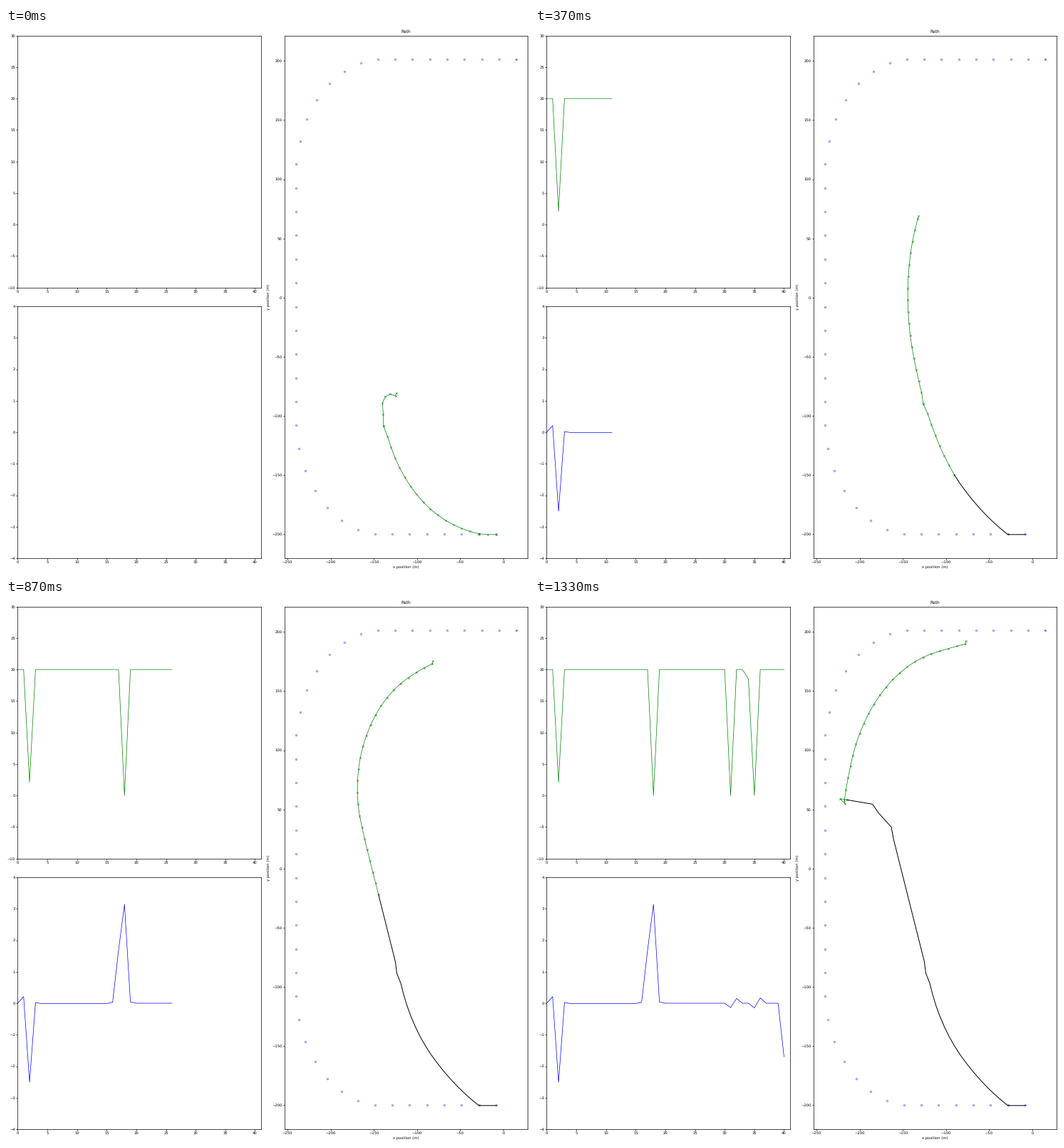
A matplotlib script that plays this animation: 734 px wide and 763 px high, repeating every 1.36 s.

```python
import numpy as np
import matplotlib.pyplot as plt
from matplotlib.animation import FuncAnimation

W, H, DPI = 734, 763, 36
TICKS, TICK_MS = 136, 10
STEPS, HORIZON = 41, 25
CRUISE, DT = 20.0, 0.5

plt.rcParams.update({
    "font.family": "DejaVu Sans", "font.size": 10.4, "text.hinting": "none",
    "axes.linewidth": 1.4, "xtick.major.width": 1.4, "ytick.major.width": 1.4,
    "axes.titlepad": 7.2, "lines.linewidth": 1.4, "lines.markersize": 6,
})


def stadium():
    """Waypoints 20.1 m apart along straights joined by two quarter circles."""
    ds, radius = 0.1, 100
    s = ds * np.arange(8041)
    turned = sum(np.clip((s - bend) / radius, 0, np.pi / 2) for bend in (155.7, 514.8))
    z = 15.4 + 201.5j + ds * np.cumsum(np.exp(1j * (np.pi + turned)))
    return z[::201]


def speeds(step):
    """Speeds as planned at a step; some changes are not foreseen."""
    v = np.full(STEPS + HORIZON, CRUISE)
    for at, value, known in ((2, 2.1, 0), (18, 0, 0), (31, 0, 31), (34, 18.5, 34),
                             (35, 0, 35), (41, -19, 40), (42, 8, 40)):
        if step >= known:
            v[at] = value
    return v


def move(start, v, degrees):
    """Positions reached from start with a speed and heading per step."""
    hops = DT * v * np.exp(1j * np.radians(degrees))
    return start + np.concatenate(([0], np.cumsum(hops)))


# Headings in degrees: the driven course, and the planned ones further ahead
course = np.interp(np.arange(STEPS),
                   [1, 3, 9, 16, 20, 30, 32, 33, 34, 36, 37],
                   [180, 149, 135, 109, 109, 109, 104, 141, 141, 133, 173])
swerve = np.zeros(STEPS + HORIZON)
swerve[[17, 19]] = 9, -9
KEY_STEPS = [0, 7, 11, 17, 26, 34, 40]
AHEAD = {
    3: [169, 134, 119, 107, 109, 140, 78],
    6: [158, 128, 113, 102, 106, 85, 73],
    12: [131, 116, 104, 87, 72, 50, 48],
    20: [96, 100, 81, 56, 29, 12, 13],
    24: [-52, 92, 67, 42, 17, 8, 10],
}

track = stadium()
speed = speeds(STEPS)[:STEPS]
past = move(-7.8 - 200.7j, speed[:-1], (course + swerve[:STEPS])[:-1])

steer = np.zeros(STEPS)
steer[4:16] = -0.01
steer[[1, 2, 3, 16, 17, 18, 19]] = 0.21, -2.51, 0.02, 0.03, 1.68, 3.14, 0.04
steer[[31, 32, 35, 36, 40]] = -0.14, 0.15, -0.15, 0.17, -1.7


def predict(step):
    """Planned positions, slower in tight turns, ending in a short hook."""
    bends = [np.interp(step, KEY_STEPS, column) for column in AHEAD.values()]
    heading = np.interp(np.arange(HORIZON), [0, *AHEAD], [course[step], *bends])
    ease = 1 / (1 + (np.gradient(heading) / 42) ** 4)
    ahead = slice(step, step + HORIZON)
    v = speeds(step)[ahead] * ease
    heading += swerve[ahead]
    v[-1], heading[-1] = 5, 70
    return move(past[step], v, heading)


fig = plt.figure(figsize=(W / DPI, H / DPI), dpi=DPI, facecolor="white")


def panel(x0, y0, x1, y1, xlim, ylim):
    """Axes placed by pixel corners, measured from the top left."""
    ax = fig.add_axes([x0 / W, 1 - y1 / H, (x1 - x0) / W, (y1 - y0) / H])
    ax.set(xlim=xlim, ylim=ylim)
    return ax


speed_ax = panel(16.4, 10.6, 357.8, 364.6, (0, 41), (-10, 30))
steer_ax = panel(16.4, 391, 357.8, 745, (0, 41), (-4, 4))
path_ax = panel(391, 10.6, 732.2, 745, (-253.3, 28.3), (-220.7, 221.6))
for ax in (speed_ax, steer_ax):
    ax.set_xticks(range(0, 41, 5))
speed_ax.set_yticks(range(-10, 31, 5))
path_ax.set_xticks(range(-250, 1, 50))
path_ax.set_yticks(range(-200, 201, 50))
path_ax.set(title="Path", xlabel="x position (m)", ylabel="y position (m)")

path_ax.plot(track.real, track.imag, "bo", alpha=0.3)
ends = track[[0, -2]]
path_ax.plot(ends.real, ends.imag, "b*", ms=5, alpha=0.6, mew=0)
plan_line, = path_ax.plot([], [], "gx-", ms=5.4, mew=0.9)
past_line, = path_ax.plot([], [], "k-", lw=2)
speed_line, = speed_ax.plot([], [], "g-")
steer_line, = steer_ax.plot([], [], "b-")


def draw(tick):
    step = (3 * tick + 1) // 10  # 30 steps per second on a 10 ms grid
    done = slice(step + 1)
    t = np.arange(step + 1)
    plan = predict(step)
    speed_line.set_data(t, speed[done])
    steer_line.set_data(t, steer[done])
    past_line.set_data(past[done].real, past[done].imag)
    plan_line.set_data(plan.real, plan.imag)
    return speed_line, steer_line, past_line, plan_line


anim = FuncAnimation(fig, draw, frames=TICKS, interval=TICK_MS, repeat=True, repeat_delay=0)
plt.show()
```
